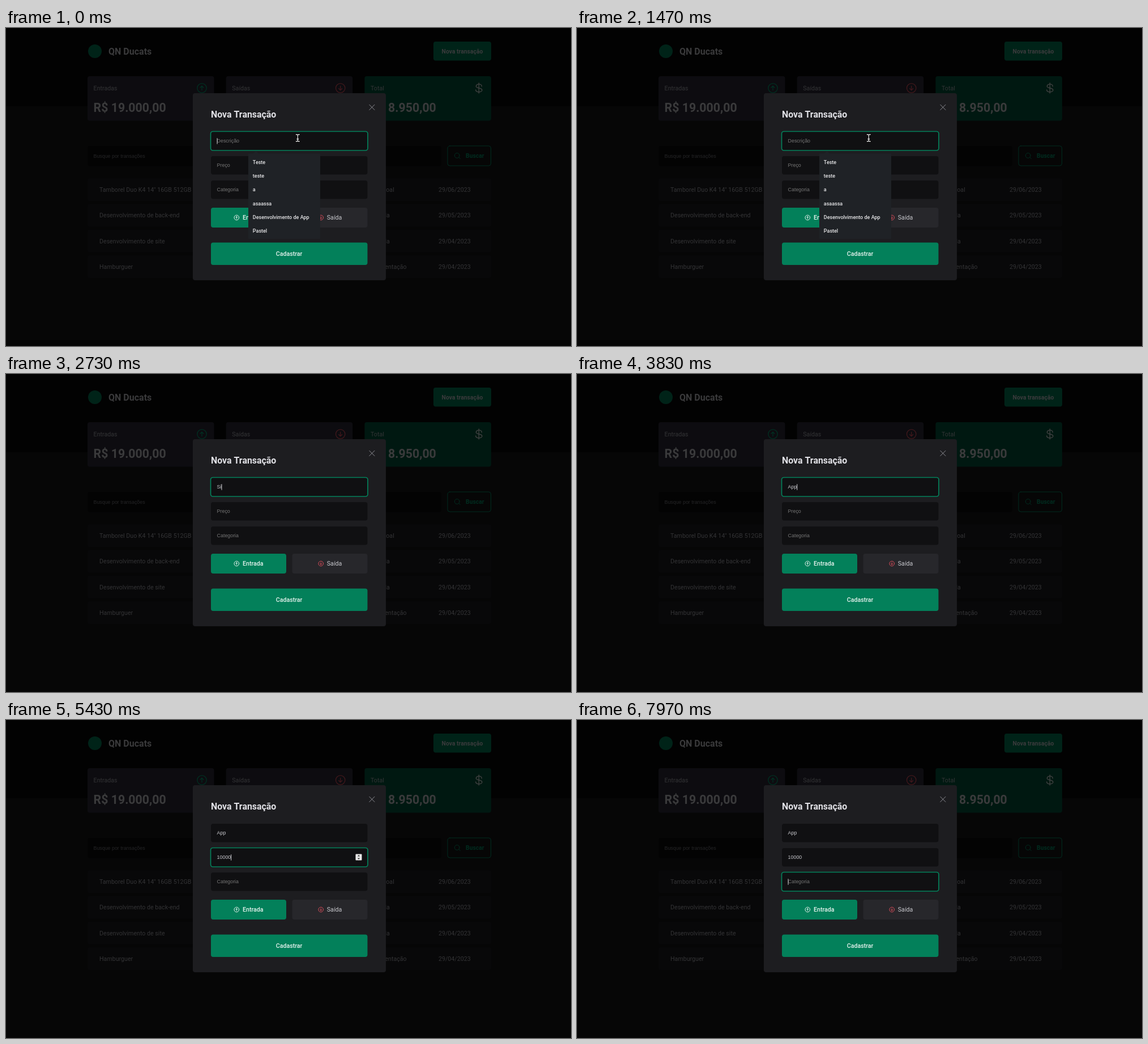
Recreate the animation shown at these times as an HTML page with a canvas. Size 998 by 561 pixels, loop 8000 ms.

```html
<!DOCTYPE html>
<html lang="pt-BR">
<head>
<meta charset="utf-8">
<title>Nova Transação</title>
<style>
  html, body { margin: 0; width: 100%; height: 100%; overflow: hidden; background: #000; }
  canvas { display: block; }
</style>
</head>
<body>
<canvas id="stage" width="998" height="561"></canvas>
<script>
const ctx = document.getElementById('stage').getContext('2d');
const LOOP = 8000;
const BLINK = 500;
const GREEN = '#03805a';
const SANS = 'Roboto, sans-serif';
const INPUT_FONT = '8.87px "Liberation Sans", Arial, sans-serif';
const font = (size, weight = 400) => `${weight} ${size}px ${SANS}`;

// Each step: start time, focused field, value of that field.
const steps = [
  [-80, 0, ''], [2370, 0, 'S'], [2600, 0, 'Si'],
  [3120, 0, 'S'], [3330, 0, 'A'], [3520, 0, 'Ap'], [3680, 0, 'App'],
  [4400, 1, ''], [4700, 1, '1'], [4880, 1, '10'], [5010, 1, '100'],
  [5140, 1, '1000'], [5270, 1, '10000'], [5800, 2, '']
];
const placeholders = ['Descrição', 'Preço', 'Categoria'];
const suggestions = ['Teste', 'teste', 'a', 'asaassa', 'Desenvolvimento de App', 'Pastel'];
const rows = [
  ['Tamborel Duo K4 14" 16GB 512GB SSD', 'Pessoal', '29/06/2023'],
  ['Desenvolvimento de back-end', 'Venda', '29/05/2023'],
  ['Desenvolvimento de site', 'Venda', '29/04/2023'],
  ['Hamburguer', 'Alimentação', '29/04/2023']
];

function box(x, y, w, h, r, fill, stroke, lineWidth = 1) {
  ctx.beginPath();
  ctx.roundRect(x, y, w, h, r);
  if (fill) { ctx.fillStyle = fill; ctx.fill(); }
  if (stroke) { ctx.strokeStyle = stroke; ctx.lineWidth = lineWidth; ctx.stroke(); }
}

// Text placed by the vertical middle of its capitals.
function text(str, x, middle, style, color, align = 'left') {
  ctx.font = style;
  ctx.fillStyle = color;
  ctx.textAlign = align;
  ctx.fillText(str, x, middle + parseFloat(style.match(/[\d.]+(?=px)/)[0]) * 0.355);
}

function line(color, width, ...paths) {
  ctx.strokeStyle = color;
  ctx.lineWidth = width;
  ctx.lineCap = ctx.lineJoin = 'round';
  ctx.beginPath();
  for (const path of paths) path.forEach(([x, y], i) => i ? ctx.lineTo(x, y) : ctx.moveTo(x, y));
  ctx.stroke();
}

function disc(x, y, r, fill) {
  ctx.beginPath();
  ctx.arc(x, y, r, 0, Math.PI * 2);
  if (fill) { ctx.fillStyle = fill; ctx.fill(); }
}

function arrowCircle(x, y, r, dir, color, width) {
  const a = r * 0.45, tip = y + dir * a;
  line(color, width, [[x, y - dir * a], [x, tip]],
    [[x - a * 0.8, tip - dir * a * 0.8], [x, tip], [x + a * 0.8, tip - dir * a * 0.8]]);
  disc(x, y, r);
  ctx.stroke();
}

function dollar(x, y, color) {
  line(color, 1.3, [[x, y - 9], [x, y + 9]]);
  ctx.beginPath();
  ctx.moveTo(x + 5, y - 3);
  ctx.bezierCurveTo(x + 5, y - 8, x - 5, y - 8, x - 5, y - 3.2);
  ctx.bezierCurveTo(x - 5, y + 1, x + 5.6, y - 1, x + 5.6, y + 3.4);
  ctx.bezierCurveTo(x + 5.6, y + 8, x - 5.6, y + 8, x - 5.6, y + 3);
  ctx.stroke();
}

function drawPage() {
  box(0, 0, 998, 561, 0, '#161619');
  box(0, 0, 998, 138, 0, '#070708');

  disc(157, 41, 12, '#00875f');
  text('QN Ducats', 181, 41, font(16, 700), '#e1e1e6');
  box(755, 24, 102, 33.5, 4, '#00875f');
  text('Nova transação', 806, 41, font(10.4, 700), '#e1e1e6', 'center');

  const cards = [['Entradas', 'R$ 19.000,00'], ['Saídas', 'R$ 10.050,00'], ['Total', 'R$ 8.950,00']];
  cards.forEach(([label, amount], i) => {
    const x = 144 + i * 244.7;
    box(x, 85, 223.5, 78.5, 4, i === 2 ? '#015f43' : '#32303f');
    text(label, x + 10.6, 106, font(10.65), '#c4c4cc');
    text(amount, x + 10.6, 140.5, font(21.3, 700), '#e1e1e6');
  });
  arrowCircle(346, 106, 8.2, -1, '#00b37e', 1.3);
  arrowCircle(590.7, 106, 8.2, 1, '#f75a68', 1.3);
  dollar(835.3, 106, '#fff');

  box(144, 208, 625, 35.5, 4, '#0b0b0c');
  text('Busque por transações', 154.5, 225.7, INPUT_FONT, '#8b8b90');
  box(780, 208, 76.5, 35, 4, null, '#00a874', 1);
  disc(796.7, 225, 4.4);
  ctx.stroke();
  line('#00a874', 1, [[800, 228.3], [802.3, 230.6]]);
  text('Buscar', 812, 225.7, font(10.4, 700), '#00a874');

  rows.forEach(([name, category, date], i) => {
    const y = 285.2 + i * 45.3;
    box(144, y - 20, 713, 40, 4, '#1e1e22');
    text(name, 165, y, font(10.65), '#c4c4cc');
    text(category, 648, y, font(10.65), '#c4c4cc');
    text(date, 764, y, font(10.65), '#c4c4cc');
  });

  box(0, 0, 998, 561, 0, 'rgba(0,0,0,.74)');
}

function drawSpinner() {
  box(617.5, 236.5, 11, 11, 1, '#e8e8e8');
  ctx.fillStyle = '#333';
  for (const dir of [-1, 1]) {
    ctx.beginPath();
    ctx.moveTo(620.8, 242 + dir * 1.5);
    ctx.lineTo(625.2, 242 + dir * 1.5);
    ctx.lineTo(623, 242 + dir * 4);
    ctx.fill();
  }
}

function drawField(i, value, focused, caretOn) {
  const y = 183 + i * 43, middle = y + 16.2;
  box(362, y, 276.5, 32.5, 4, '#101012');
  if (focused) box(361.5, y - 0.5, 277.5, 33.5, 4, null, GREEN, 1.7);
  text(value || placeholders[i], 372.6, middle, INPUT_FONT, value ? '#c9c9ce' : '#757575');
  if (focused && i === 1) drawSpinner();
  if (focused && caretOn) {
    const x = 372.6 + (value ? ctx.measureText(value).width : 0);
    box(x, middle - 5, 0.9, 10.5, 0, '#e1e1e6');
  }
}

function drawModal(values, focus, caretOn) {
  box(330, 115, 341, 330, 4, '#1d1d20');
  text('Nova Transação', 362, 152.3, font(15.9, 700), '#e1e1e6');
  line('#8d8d94', 1, [[641.8, 135.3], [651, 144.5]], [[651, 135.3], [641.8, 144.5]]);

  values.forEach((value, i) => drawField(i, value, focus === i, caretOn));

  box(362, 317, 133, 35, 4, GREEN);
  arrowCircle(407.3, 334.5, 4.3, -1, '#e8f3ef', 1);
  text('Entrada', 418, 334.7, font(10.65, 500), '#e8f3ef');
  box(505.5, 317, 133, 35, 4, '#27272b');
  arrowCircle(556.2, 334.5, 4.3, 1, '#d84c5a', 1);
  text('Saída', 566.8, 334.7, font(10.65), '#c9c9ce');
  box(362, 378.5, 276.5, 39.5, 4, GREEN);
  text('Cadastrar', 500, 398.4, font(10.65, 500), '#e8f3ef', 'center');
}

function drawSuggestions() {
  ctx.fillStyle = '#1f2226';
  ctx.beginPath();
  ctx.moveTo(436, 222);
  ctx.lineTo(441.5, 217);
  ctx.lineTo(447, 222);
  ctx.fill();
  box(428, 221.5, 127, 150.5, 1, '#1f2226');
  suggestions.forEach((item, i) => text(item, 435.8, 236.5 + i * 24.3, font(9, 500), '#e6e6e8'));
}

function drawPointer(x, y) {
  const shape = [
    [[x - 3, y - 6], [x - 1, y - 6], [x, y - 5], [x + 1, y - 6], [x + 3, y - 6]],
    [[x, y - 5], [x, y + 5]],
    [[x - 3, y + 6], [x - 1, y + 6], [x, y + 5], [x + 1, y + 6], [x + 3, y + 6]],
    [[x - 1.5, y + 2], [x + 1.5, y + 2]]
  ];
  line('#000', 3, ...shape);
  line('#e4e4e4', 1.3, ...shape);
}

function draw(t) {
  const values = ['', '', ''];
  let since = 0, focus = 0;
  for (const [start, field, value] of steps) {
    if (start > t) break;
    since = start;
    focus = field;
    values[field] = value;
  }
  const caretOn = Math.floor((t - since) / BLINK) % 2 === 0;

  drawPage();
  drawModal(values, focus, caretOn);
  if (t < steps[1][0]) {
    drawSuggestions();
    drawPointer(515.3, 194);
  }
}

const begin = performance.now();
function frame() {
  draw((performance.now() - begin) % LOOP);
  requestAnimationFrame(frame);
}
frame();
</script>
</body>
</html>
```
